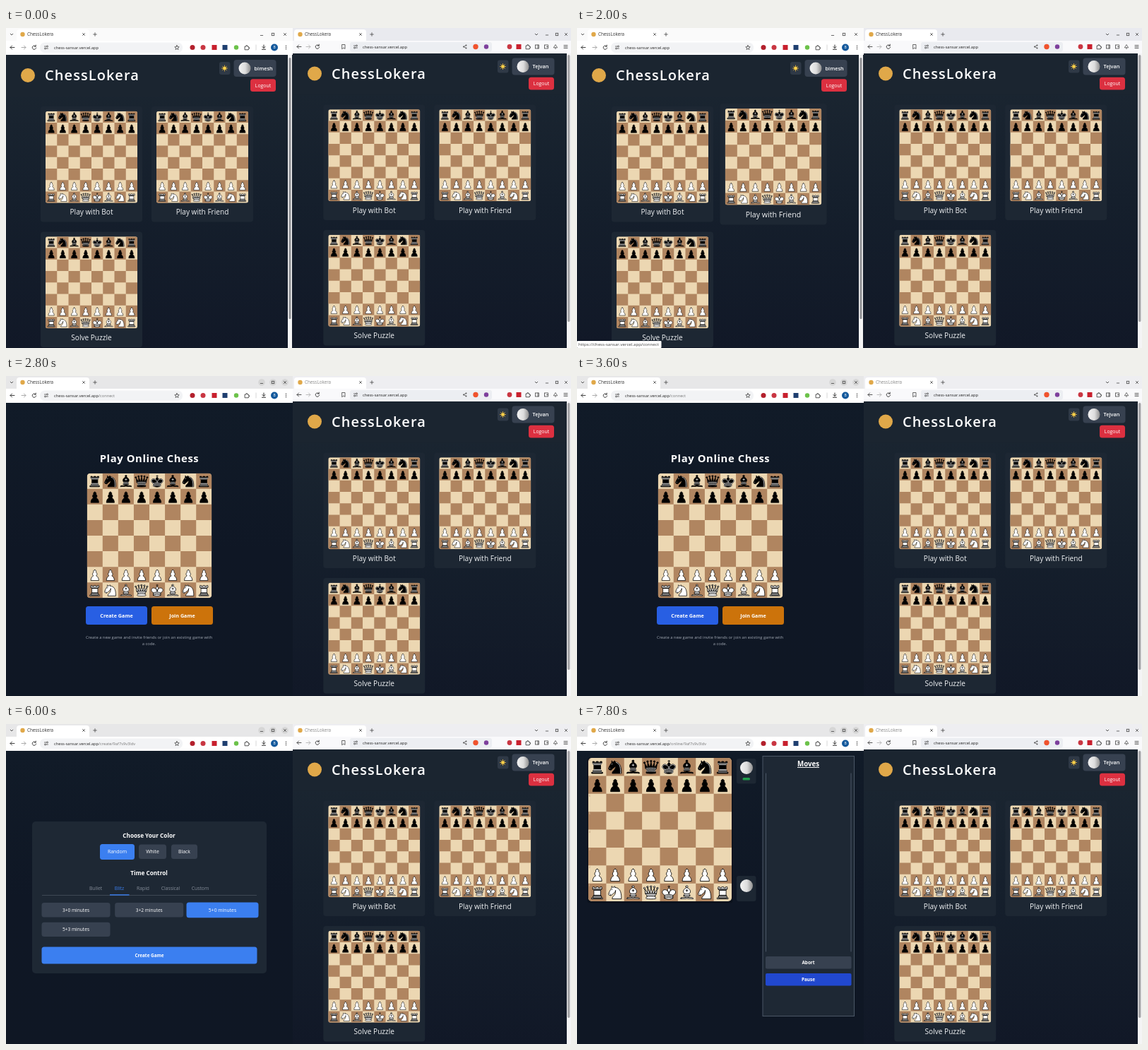
Animation, 800 px wide and 453 px high, one loop 8000 ms. Source, as an HTML page:

```html
<!DOCTYPE html>
<html lang="en">
<head>
<meta charset="utf-8">
<title>Chess demo</title>
<style>
  html, body { margin: 0; width: 100%; height: 100%; overflow: hidden; }
  svg { display: block; font-family: "Open Sans", "Noto Sans", sans-serif; }
  .line { fill: none; stroke-linecap: round; stroke-linejoin: round; }
</style>
</head>
<body>
<svg id="stage" width="800" height="453" viewBox="0 0 800 453"></svg>
<script>
const BRAND = 'ChessLokera';
const HOST = 'chess-sansar.vercel.app';
const BLUE = '#3b7ff0', DEEP = '#285fe3', GREY = '#374150', CARD = '#1d2733', GOLD = '#e0a849';

const rect = (x, y, w, h, fill, r = 0, more = '') =>
  `<rect x="${x}" y="${y}" width="${w}" height="${h}" rx="${r}" fill="${fill}" ${more}/>`;
const dot = (x, y, r, fill, more = '') => `<circle cx="${x}" cy="${y}" r="${r}" fill="${fill}" ${more}/>`;
const line = (d, color = '#444', w = 1) =>
  `<path class="line" d="${d}" stroke="${color}" stroke-width="${w}"/>`;
const text = (x, y, s, size, fill = '#fff', more = '') =>
  `<text x="${x}" y="${y}" font-size="${size}" fill="${fill}" ${more}>${s}</text>`;
const mid = (x, y, s, size, fill, weight = 400, more = '') =>
  text(x, y, s, size, fill, `text-anchor="middle" font-weight="${weight}" ${more}`);
const group = (id, body) => `<g id="${id}">${body}</g>`;
const button = (x, y, w, h, fill, label, size, weight = 400) =>
  rect(x, y, w, h, fill, 3.5) + mid(x + w / 2, y + h / 2 + size * .36, label, size, '#fff', weight);

// Chess pieces on a 45-unit square: body, detail lines, extra lines for black
const ring = (x, y, r) => `M${x - r} ${y}a${r} ${r} 0 1 1 ${2 * r} 0a${r} ${r} 0 1 1 ${-2 * r} 0z`;
const PIECES = {
  p: ['M22.5 9c-2.21 0-4 1.79-4 4 0 .89.29 1.71.78 2.38C17.33 16.5 16 18.59 16 21c0 2.03.94 3.84 2.41 5.03-3 1.06-7.41 5.55-7.41 13.47h23c0-7.92-4.41-12.41-7.41-13.47 1.47-1.19 2.41-3 2.41-5.03 0-2.41-1.33-4.5-3.28-5.62.49-.67.78-1.49.78-2.38 0-2.21-1.79-4-4-4z', '', ''],
  r: ['M9 39h27v-3H9zM12 36v-4h21v4zM14 29.5V17h17v12.5l1.5 2.5h-20zM11 14V9h4v2h5V9h5v2h5V9h4v5l-3 3H14z',
    'M11 14h23M14 17h17M14 29.5h17', 'M12 35.5h21M13 31.5h19'],
  n: ['M22 10c10.5 1 16.5 8 16 29H15c0-9 10-6.5 8-21M24 18c.38 2.91-5.55 7.37-8 9-3 2-2.82 4.34-5 4-1.04-.94 1.41-3.04 0-3-1 0 .19 1.23-1 2-1 0-4 1-4-4 0-2 6-12 6-12s1.89-1.9 2-3.5c-.73-1-.5-2-.5-3 1-1 3 2.5 3 2.5h2s.78-2 2.5-3c1 0 1 3 1 3',
    'M9 25.5v.1M14.7 15l-.5 1', 'M25 11.5c8 2 11.5 9 11 27'],
  b: ['M9 36c3.39-.97 10.11.43 13.5-2 3.39 2.43 10.11 1.03 13.5 2 0 0 1.65.54 3 2-.68.97-1.65.99-3 .5-3.39-.97-10.11.46-13.5-1-3.39 1.46-10.11.03-13.5 1-1.35.49-2.32.47-3-.5 1.35-1.94 3-2 3-2zM15 32c2.5 2.5 12.5 2.5 15 0 .5-1.5 0-2 0-2 0-2.5-2.5-4-2.5-4 5.5-1.5 6-11.5-5-15.5-11 4-10.5 14-5 15.5 0 0-2.5 1.5-2.5 4 0 0-.5.5 0 2z' + ring(22.5, 8, 2.5),
    'M17.5 26h10M15 30h15M22.5 15.5v5M20 18h5', ''],
  q: ['M9 26c8.5-1.5 21-1.5 27 0l2-12-7 11V11l-5.5 13.5-3-15-3 15-5.5-14V25L7 14zM9 26c0 2 1.5 2 2.5 4 1 1.5 1 1 .5 3.5-1.5 1-1.5 2.5-1.5 2.5-1.5 1.5.5 2.5.5 2.5 6.5 1 16.5 1 23 0 0 0 1.5-1 0-2.5 0 0 .5-1.5-1-2.5-.5-2.5-.5-2 .5-3.5 1-2 2.5-2 2.5-4-8.5-1.5-18.5-1.5-27 0z'
    + ring(6, 12, 2) + ring(14, 9, 2) + ring(22.5, 8, 2) + ring(31, 9, 2) + ring(39, 12, 2),
    'M11.5 30c3.5-1 18.5-1 22 0M12 33.5c6-1 15-1 21 0', 'M10.5 26.5c8-1.2 16-1.2 24 0'],
  k: ['M22.5 11.6V6M20 8h5M22.5 25s4.5-7.5 3-10.5c0 0-1-2.5-3-2.5s-3 2.5-3 2.5c-1.5 3 3 10.5 3 10.5M11.5 37c5.5 3.5 15.5 3.5 21 0v-7s9-4.5 6-10.5c-4-6.5-13.5-3.5-16 4V27v-3.5c-3.5-7.5-13-10.5-16-4-3 6 5 10 5 10V37z',
    'M11.5 30c5.5-3 15.5-3 21 0M11.5 33.5c5.5-3 15.5-3 21 0M11.5 37c5.5-3 15.5-3 21 0',
    'M32 29.5s8.5-4 6-9.6C34.2 14 25 18 22.5 24.5v2-2C20 18 10.9 14 7 19.9 4.5 25.5 13 29.5 13 29.5']
};

function piece(kind, white, col, row) {
  const [body, detail, extra] = PIECES[kind];
  return `<g transform="translate(${col * 45} ${row * 45})" class="line" stroke-width="1.5">
    <path d="${body}" fill="${white ? '#fff' : '#000'}" stroke="#000"/>
    <path d="${white ? detail : detail + extra}" stroke="${white ? '#000' : '#ececec'}"/></g>`;
}

function boardSymbol() {
  let dark = '', men = '';
  for (let i = 0; i < 64; i++) {
    const col = i % 8, row = i >> 3;
    if ((col + row) % 2) dark += `M${col * 45} ${row * 45}h45v45h-45z`;
    if (row < 2 || row > 5) men += piece(row % 7 ? 'p' : 'rnbqkbnr'[col], row > 5, col, row);
  }
  return `<clipPath id="round">${rect(0, 0, 360, 360, '#000', 9)}</clipPath>
    <symbol id="board" viewBox="0 0 360 360"><g clip-path="url(#round)">
    ${rect(0, 0, 360, 360, '#ecd7b2')}<path d="${dark}" fill="#b08560"/>${men}</g></symbol>`;
}
const board = (x, y, size) => `<use href="#board" x="${x}" y="${y}" width="${size}" height="${size}"/>`;
const avatar = (x, y, r) => dot(x, y, r, 'url(#photo)');

// Browser chrome
const cross = (x, y, r = 2) => line(`M${x - r} ${y - r}l${2 * r} ${2 * r}m0 ${-2 * r}l${-2 * r} ${2 * r}`, '#444', .8);
const arrow = (x, y, s, color) => line(`M${x + 3 * s} ${y}h${-6 * s}m${2.5 * s} -2.5l${-2.5 * s} 2.5l${2.5 * s} 2.5`, color);
const reload = (x, y) => line(`M${x + 2} ${y - 1.6}a2.7 2.7 0 1 0 .6 2.2m-.4 -4v2h-2`, '#444');
const tune = (x, y) => line(`M${x - 2.5} ${y - 1.5}h2.5m2.5 3h-2.5`, '#444', .8)
  + dot(x + 1.5, y - 1.5, 1, 'none', 'stroke="#444" stroke-width=".8"')
  + dot(x - 1.5, y + 1.5, 1, 'none', 'stroke="#444" stroke-width=".8"');
const menu = (x, y) => [-2.2, 0, 2.2].map(d => dot(x, y + d, .7, '#444')).join('');
const puzzle = (x, y) => line(`M${x - 2.5} ${y - 1.5}h1.5v-1.2h1.5v1.2h1.8v1.6h1.2v1.6h-1.2v1.6h-4.8z`, '#444', .9);
const plus = (x, y) => line(`M${x - 2.3} ${y}h4.6M${x} ${y - 2.3}v4.6`, '#444', .8);
const chevron = (x, y) => line(`M${x - 1.8} ${y - .8}l1.8 1.8l1.8 -1.8`, '#444', .9);
const square = (x, y, s = 3.4) => `<rect x="${x - s / 2}" y="${y - s / 2}" width="${s}" height="${s}" fill="none" stroke="#444" stroke-width=".8"/>`;
const tab = (x, w) => rect(x, 2, w, 20, '#fff', 4) + dot(x + 8.5, 9, 3.2, GOLD);

function leftChrome() {
  return rect(0, 0, 406, 38, '#fafafa', 0, 'id="leftBar"') + tab(15, 103) + rect(0, 18, 406, 20, '#fff')
    + chevron(8, 9) + text(30, 11.2, BRAND, 6.3, '#333') + cross(110, 9, 1.5) + plus(126, 9)
    + group('rings', [362, 378, 395].map(x => dot(x, 9, 4.8, '#d6d6d6')).join(''))
    + line('M360.3 10.5h3.4', '#444', .8) + square(378, 9) + cross(395, 9, 1.6)
    + rect(48, 20.5, 202, 14.5, '#f2f3f5', 7)
    + arrow(9, 27.5, 1, '#444') + arrow(25, 27.5, -1, '#aaa') + reload(40, 27.5) + tune(57, 27.5)
    + `<text x="68" y="29.7" font-size="5.7" fill="#222">${HOST}<tspan id="path" fill="#777"></tspan></text>`
    + line('M242 24.5l.9 2.1 2.3.2-1.8 1.5.6 2.2-2-1.2-2 1.2.6-2.2-1.8-1.5 2.3-.2z', '#444', .8)
    + dot(264, 27.5, 3.5, '#b3202c') + dot(279, 27.5, 3.5, '#c93642') + rect(291.5, 24, 7, 7, '#c8202e')
    + rect(306.5, 24, 7, 7, '#1f3f70') + dot(326, 27.5, 3.2, '#6cc24a') + puzzle(341, 27.5)
    + line('M354 24v7', '#ccc', .8) + line('M365 24v4.5m-2-2l2 2 2-2m-4.5 3.8h5', '#333')
    + dot(380, 27.5, 5, '#14599c') + mid(380, 29.4, 'B', 5, '#fff') + menu(396.5, 27.5);
}

function rightChrome() {
  return rect(405, 0, 395, 36, '#e9eaef', 0, 'id="rightBar"') + tab(408, 102) + rect(405, 18, 395, 18, '#f9f9fb')
    + text(423, 11.2, BRAND, 6.3, '#333', 'id="rightTitle"') + cross(502, 9, 1.5) + plus(518, 9)
    + chevron(751, 9) + line('M764.3 10h3.4', '#444', .8) + square(780, 9) + cross(793, 9, 1.6)
    + rect(487, 20, 201, 13.5, '#eceef2', 3)
    + arrow(415, 26.5, 1, '#555') + arrow(428, 26.5, -1, '#bbb') + reload(441, 26.5)
    + line('M476 23.5h4v6l-2-1.6-2 1.6z', '#444', .8) + tune(495, 26.5) + text(505, 28.5, HOST, 5.7, '#222')
    + line('M651.5 24.5l-3.5 2 3.5 2', '#555', .8)
    + [[651.5, 24.5], [648, 26.5], [651.5, 28.5]].map(([x, y]) => dot(x, y, 1, '#555')).join('')
    + dot(665, 26.5, 3.7, '#f0532d') + dot(680, 26.5, 3.2, '#7d3f9c')
    + dot(713, 26.5, 3.4, '#c93642') + rect(722.5, 23, 7, 7, '#c8202e') + puzzle(739, 26.5)
    + square(752, 26.5, 5) + line('M753 24v5', '#444', .8) + square(765, 26.5, 5) + line('M765.5 26.5h2', '#444', .8)
    + line('M775.5 27.5l2.5-4 2.5 4zm2.5 0v2.2', '#555', .8) + line('M790 24.5h5m-5 2h5m-5 2h5', '#444', .8);
}

// Pages
function card(x, y, label, id) {
  return group(id, rect(x, y, 144, 163.5, CARD, 4) + board(x + 7, y + 6.7, 130)
    + mid(x + 72, y + 153, label, 10.1, '#f1f3f5'));
}

function home(side, user, x, y, brandX, userX) {
  let rays = '';
  for (let i = 0; i < 8; i++) {
    const a = i * Math.PI / 4;
    rays += `M309.5 57l${4 * Math.cos(a)} ${4 * Math.sin(a)}`;
  }
  return rect(x, 38 + y, 406, 418, 'url(#homeBg)') + rect(x, 38 + y, 406, 59, '#1b2530', 0, 'opacity=".9"')
    + `<g transform="translate(${brandX} ${y})">` + dot(31, 67, 10, GOLD)
    + text(55, 74.3, BRAND, 20, '#fff', 'font-weight="600" letter-spacing="1.1"') + '</g>'
    + `<g transform="translate(${userX} ${y})">` + rect(302, 48, 15.5, 18, '#2f3946', 3)
    + line(rays, '#e8b53a', .9) + dot(309.5, 57, 2.3, '#ffd24a')
    + rect(322.5, 45, 60, 24, GREY, 4) + avatar(338, 57, 8.5) + text(351.5, 59.8, user, 7.4, '#fff', 'font-weight="600"')
    + button(346, 72.2, 36, 17.8, '#dc3040', 'Logout', 6.9) + '</g>'
    + `<g transform="translate(${x && 400.3} ${y})">` + card(49, 111, 'Play with Bot', side + 'Bot')
    + card(206, 111, 'Play with Friend', side + 'Friend') + card(49, 288.5, 'Solve Puzzle', side + 'Puzzle') + '</g>';
}

const blank = rect(0, 38, 406, 415, 'url(#pageBg)');

const connect = blank
  + mid(203, 122, 'Play Online Chess', 14.8, '#fff', 700, 'letter-spacing=".6"') + board(114.7, 137.7, 176.6)
  + button(113, 326, 87, 26, DEEP, 'Create Game', 7.2, 700) + button(206, 326, 87, 26, '#cc730b', 'Join Game', 7.2, 700)
  + mid(202.5, 372, 'Create a new game and invite friends or join an existing game with', 5.8, '#a0a7b2')
  + mid(202.5, 380.7, 'a code.', 5.8, '#a0a7b2');

const create = blank + rect(37, 138, 332, 215, '#1e2834', 5)
  + mid(202.5, 160.5, 'Choose Your Color', 8.2, '#fff', 700)
  + button(133, 170, 49, 22, BLUE, 'Random', 6.9) + button(188, 170.5, 39, 20.5, GREY, 'White', 6.9)
  + button(234, 170.5, 37, 20.5, GREY, 'Black', 6.9)
  + mid(202.5, 214, 'Time Control', 8.2, '#fff', 700)
  + [['Bullet', 127], ['Blitz', 160.5], ['Rapid', 194], ['Classical', 233], ['Custom', 275]]
    .map(([s, x]) => mid(x, 235, s, 6.8, s === 'Blitz' ? BLUE : '#858d99')).join('')
  + rect(51, 242, 304, .8, '#46505d') + rect(147, 241.2, 27.5, 1.4, BLUE)
  + button(50.5, 253, 97, 20.5, GREY, '3+0 minutes', 6.6) + button(154.2, 253, 97, 20.5, GREY, '3+2 minutes', 6.6)
  + button(255.5, 252.5, 102, 21.7, BLUE, '5+0 minutes', 6.8) + button(50.5, 280.8, 97, 20.3, GREY, '5+3 minutes', 6.6)
  + group('submit', button(50.5, 315.5, 305, 24, BLUE, 'Create Game', 6.4, 700));

let ranks = '';
for (let i = 0; i < 8; i++) ranks += text(16.8, 52 + i * 25.4, 8 - i, 3.6, i % 2 ? '#ecd7b2' : '#b08560');

const game = blank + rect(14.5, 47.5, 206, 206, '#0a111c', 4) + board(16, 48, 203) + ranks
  + rect(226, 49, 27.5, 35.5, CARD, 3) + avatar(240, 62, 9) + rect(234.5, 76, 10.5, 3.5, '#1f9d4c', 1.5)
  + rect(226, 215, 27.5, 36, CARD, 3) + avatar(240, 229, 9)
  + rect(263, 45.5, 129.5, 368, '#1e2834', 0, 'stroke="#4b5766"')
  + mid(327.5, 60, 'Moves', 9.7, '#fff', 700, 'text-decoration="underline"')
  + line('M267.5 70v252M388 70v252', '#4b5766')
  + rect(267, 329, 121.5, 17.5, GREY, 2) + mid(327.5, 340, 'Abort', 6.4, '#fff', 700)
  + rect(267, 353, 121.5, 17.5, '#2148cf', 2) + mid(327.5, 364, 'Pause', 6.4, '#fff', 700);

const gradient = (id, stops) => `<linearGradient id="${id}" x2="0" y2="1">`
  + stops.map((c, i) => `<stop offset="${i / (stops.length - 1)}" stop-color="${c}"/>`).join('') + '</linearGradient>';

const $ = id => document.getElementById(id);
$('stage').innerHTML = '<defs>' + gradient('homeBg', ['#1c2732', '#151f2c', '#111827'])
  + gradient('pageBg', ['#111b28', '#0f1725', '#0f1724'])
  + `<linearGradient id="photo"><stop offset="0" stop-color="#f4f4f4"/><stop offset=".55" stop-color="#dcdcdc"/>
     <stop offset="1" stop-color="#8d8d8d"/></linearGradient>` + boardSymbol() + '</defs>'
  + home('right', 'Tejvan', 405, -2.5, 406, 394)
  + rect(794, 36, 6, 417, '#f4f4f5') + rect(795, 38, 3.5, 378, '#a5a5a8', 1.7) + rightChrome()
  + group('home', home('left', 'bimesh', 0, 0, 0, 0)
    + rect(399, 38, 6, 415, '#f4f4f5') + rect(400.5, 42, 3, 370, '#8f9094', 1.5)
    + group('status', rect(0, 443, 119.5, 10, '#fff', 1) + text(2, 450.3, `https://${HOST}/connect`, 6.15, '#444')))
  + group('connect', connect) + group('create', create) + group('game', game) + leftChrome();

// Timeline
const ease = (t, from, ms) => {
  const k = Math.min(1, Math.max(0, (t - from) / ms));
  return k * k * (3 - 2 * k);
};
const show = (id, on) => { $(id).style.display = on ? '' : 'none'; };
const grow = (id, x, y, s) =>
  $(id).setAttribute('transform', `translate(${x} ${y}) scale(${s}) translate(${-x} ${-y})`);
const SCENES = [['home', 0], ['connect', 2400], ['create', 3800], ['game', 7200]];

function draw(t) {
  const scene = SCENES.filter(s => s[1] <= t).pop()[0];
  SCENES.forEach(([id]) => show(id, id === scene));

  const focused = t >= 2200;
  show('rings', focused);
  $('leftBar').setAttribute('fill', focused ? '#e7e7e8' : '#fafafa');
  $('rightBar').setAttribute('fill', focused ? '#eeeef1' : '#e9eaef');
  $('rightTitle').setAttribute('fill', focused ? '#888' : '#333');
  $('path').textContent = t < 2400 ? '' : t < 3800 ? '/connect' : (t < 6800 ? '/create' : '/online') + '/9af7s9v3ldv';

  show('status', t >= 1500);
  grow('leftFriend', 278, 192.7, 1 + .05 * ease(t, 1400, 300));
  const hover = ease(t, 6200, 300);
  grow('submit', 203, 327.5, 1 + .018 * hover);
  $('submit').firstChild.setAttribute('fill', hover > .5 ? DEEP : BLUE);
}

function tick(now) {
  draw(now % 8000);
  requestAnimationFrame(tick);
}
draw(0);
requestAnimationFrame(tick);
</script>
</body>
</html>
```
